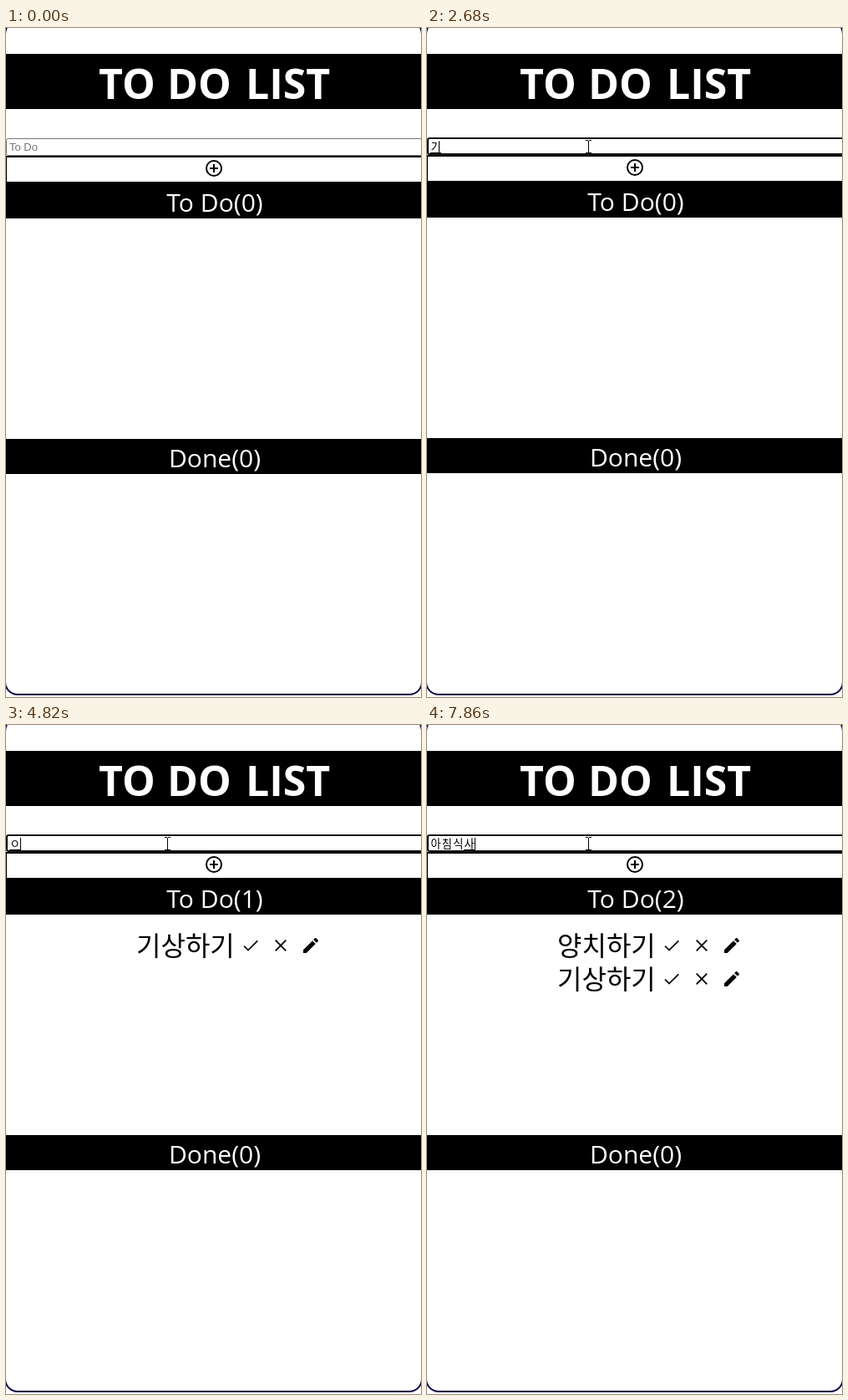
Animation, 497 px wide and 801 px high, one loop 8 s. Source, as an HTML page with a canvas:

```html
<!DOCTYPE html>
<html lang="ko">
<head>
<meta charset="utf-8">
<title>To Do List</title>
<style>
  html, body { margin: 0; height: 100%; overflow: hidden; background: #fff; }
  canvas { display: block; }
</style>
</head>
<body>
<canvas id="stage" width="497" height="801"></canvas>
<script>
const ctx = document.getElementById('stage').getContext('2d');
const LOOP = 8000, CELL = 13.33;
const FOCUS = 1160, BLINK = 530;
const LATIN = '"Open Sans", "Noto Sans", sans-serif';
const HANGUL = '"Noto Sans CJK KR", "Noto Sans CJK", sans-serif';

// Input value after each key; an empty value means Enter was pressed.
const keys = [
  [1890, 'ㄱ'], [2150, '기'], [2750, '깃'], [2880, '기사'], [3010, '기상'],
  [3230, '기상ㅎ'], [3300, '기상하'], [3430, '기상학'], [3500, '기상하기'], [3830, ''],
  [4820, 'ㅇ'], [4890, '야'], [5020, '양'], [5150, '양ㅊ'], [5280, '양치'],
  [5610, '양치ㅎ'], [5680, '양치하'], [5810, '양치학'], [5880, '양치하기'], [6010, ''],
  [6410, 'ㅇ'], [6480, '아'], [6680, '앛'], [6780, '아치'], [6880, '아침'],
  [7140, '아침ㅅ'], [7270, '아침시'], [7400, '아침식'], [7660, '아침싟'], [7860, '아침식사']
];

const check = new Path2D('M4.1 12.7 9 17.6 20.3 6.3');
const cross = new Path2D('M5.7 5.7 18.3 18.3M18.3 5.7 5.7 18.3');
const pencil = new Path2D('M3 17.25V21h3.75L17.81 9.94l-3.75-3.75z' +
  'M20.71 7.04a1 1 0 0 0 0-1.41l-2.34-2.34a1 1 0 0 0-1.41 0l-1.83 1.83 3.75 3.75z');
const plus = new Path2D('M3 12a9 9 0 1 0 18 0a9 9 0 1 0-18 0M7 12h10M12 7v10');
const arrow = new Path2D('M.5 .5V16L4 12.8 6.3 18.3 8.6 17.3 6.3 12H11Z');

function stateAt(t) {
  const state = { text: '', items: [], last: FOCUS };
  for (const [time, text] of keys) {
    if (time > t) break;
    if (!text) state.items.unshift(state.text);
    state.text = text;
    state.last = time;
  }
  return state;
}

function rect(x, y, w, h, color = '#000') {
  ctx.fillStyle = color;
  ctx.fillRect(x, y, w, h);
}

function label(str, x, y, font, color, align = 'left') {
  ctx.font = font;
  ctx.fillStyle = color;
  ctx.textAlign = align;
  ctx.fillText(str, x, y);
}

function frame(x, y, w, h, r, width, color) {
  ctx.beginPath();
  ctx.roundRect(x, y, w, h, r);
  ctx.lineWidth = width;
  ctx.strokeStyle = color;
  ctx.stroke();
}

function icon(path, x, y, width) {
  ctx.save();
  ctx.translate(x, y);
  ctx.lineWidth = width;
  ctx.strokeStyle = ctx.fillStyle = '#000';
  if (width) ctx.stroke(path); else ctx.fill(path);
  ctx.restore();
}

function drawPage(items, top) {
  const bar = '30px ' + LATIN;
  rect(0, 153 + top, 497, 75);
  rect(1, 155 + top, 496, 29, '#fff');
  icon(plus, 237, 156 + top, 2);
  label(`To Do(${items.length})`, 250, 220 + top, bar, '#fff', 'center');
  rect(0, 492 + top, 497, 42);
  label('Done(0)', 250, 526 + top, bar, '#fff', 'center');
  items.forEach((item, i) => {
    const y = top + i * 40;
    label(item, 156, 277 + y, '300 32px ' + HANGUL, '#000');
    icon(check, 281, 253 + y, 1.8);
    icon(cross, 317, 253 + y, 1.8);
    icon(pencil, 353, 253 + y, 0);
  });
}

function drawInput(t, { text, last }, top) {
  const focused = t >= FOCUS;
  if (focused) frame(1, 133 + top, 505, 19, 2, 2, '#101010');
  else frame(0.5, 132.5, 505, 20, 2, 1, '#767676');
  if (!text) label('To Do', 4, 147, '13px "Liberation Sans", sans-serif', '#757575');
  [...text].forEach((ch, i) =>
    label(ch, 4.5 + i * CELL, 147, '300 13.33px ' + HANGUL, '#000'));
  const caret = Math.floor(4 + text.length * CELL);
  if (text) rect(caret - 13, 149, 13, 1);
  if (focused && (t - last) % (2 * BLINK) < BLINK) rect(caret, 135, 1, 15);
}

function drawPointer(t) {
  if (t < 130) return;
  if (t >= 960) {
    rect(193, 135, 1, 15);
    for (const y of [134, 149]) {
      rect(190, y, 3, 1);
      rect(194, y, 3, 1);
    }
    return;
  }
  const p = Math.min(10, Math.floor((t - 130) / 77)) / 10;
  const left = (1 - p) ** 2;
  ctx.save();
  ctx.translate(Math.round(190 + 60 * left), Math.round(136 + 654 * left));
  ctx.fillStyle = '#fff';
  ctx.fill(arrow);
  ctx.restore();
  icon(arrow, Math.round(190 + 60 * left), Math.round(136 + 654 * left), 1);
}

function draw(t) {
  const state = stateAt(t);
  const top = state.text ? -1 : 0;
  rect(0, 0, 497, 801, '#fff');
  frame(-1, -8, 499, 806, 15, 2, '#000040');
  rect(0, 31, 497, 66);
  const title = 'bold 50px ' + LATIN;
  label('TO', 111, 85, title, '#fff');
  label('DO', 193, 85, title, '#fff');
  label('LIST', 287, 85, title, '#fff');
  drawPage(state.items, top);
  drawInput(t, state, top);
  drawPointer(t);
}

const start = performance.now();
function tick() {
  draw((performance.now() - start) % LOOP);
  requestAnimationFrame(tick);
}
tick();
</script>
</body>
</html>
```
